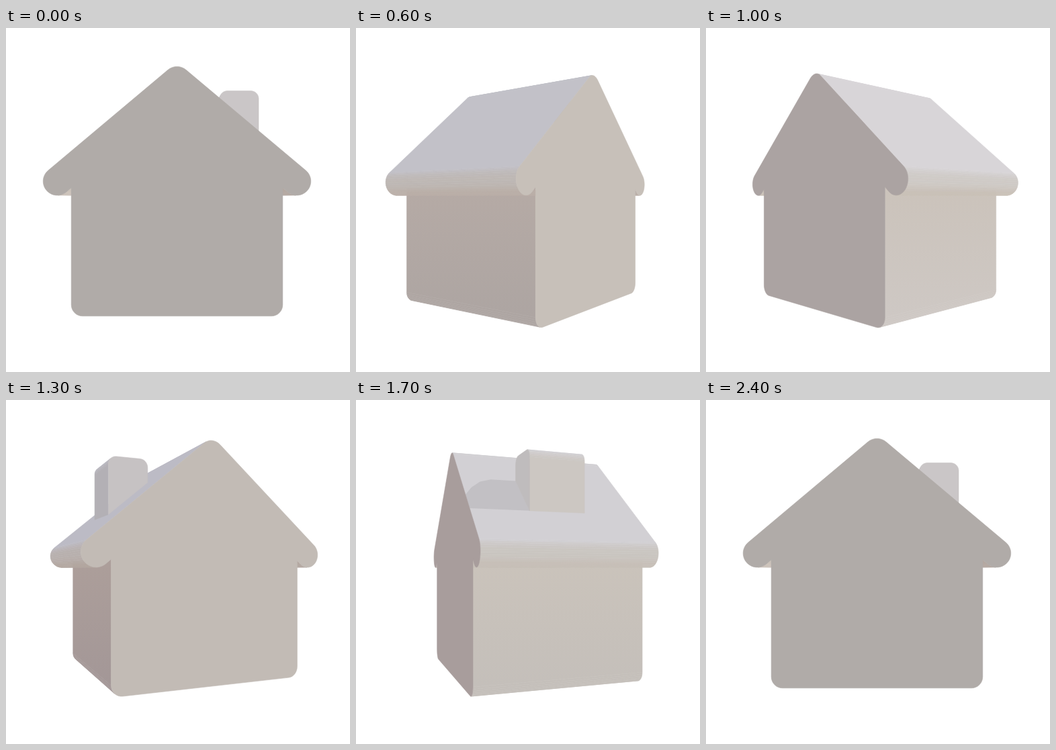
Recreate the animation shown at these times as an HTML page with a canvas. Size 512 by 512 pixels, loop 2.5 s.

```html
<!DOCTYPE html>
<html>
<head>
<meta charset="utf-8">
<style>
html, body { margin: 0; width: 100%; height: 100%; overflow: hidden; background: #fff; }
canvas { display: block; width: 100vmin; height: 100vmin; }
</style>
</head>
<body>
<canvas id="stage" width="512" height="512"></canvas>
<script>
const ctx = document.getElementById('stage').getContext('2d');
const RAD = Math.PI / 180;
const CX = 254.5, HORIZON = 250, CAMERA = 700;
const DEPTH = 112.6, WALL = 132, NOTCH = 10.2, FLOOR = -150;
const CHIMNEY = { left: 60, right: 115, top: 148, depth: 37.5, radius: 11 };

// Colours by the direction a surface turns to, in degrees right of the viewer
const ANGLES = [-68, -24, 0, 22, 68];
const palette = text => text.split(' ').map(h => [0, 2, 4].map(i => parseInt(h.substr(i, 2), 16)));
const COLORS = {
  face: palette('a89d9c aeaaa8 b0aba8 c2bbb5 cac2bb'),
  wallTop: palette('ab9d99 bab0aa c6bfb9 cbc3bb ccc2ba'),
  wallLow: palette('a29696 b2aba7 bfbbb6 c5c0ba d9d2d0'),
  roof: palette('bcbbc5 c4c3c9 cac8cd d3d1d5 dedadc'),
  eave: palette('b8b0ae c0bbb7 c6c2bd cac6c1 d4cfcc'),
  under: palette('b3a7a0 bdb3ab c3bbb4 c8c0b8 cbc2b9'),
  stackFace: palette('bfbcbd c4c0c0 cac6c7 c6c2c3 cbc7c7'),
  stackSide: palette('b3b0b5 c0bcbd c9c4c2 ccc7c2 d6d1d0')
};

const mix = (a, b, k) => a.map((v, i) => v + (b[i] - v) * k);
const css = c => `rgb(${c.map(Math.round)})`;

function shade(name, angle) {
  const list = COLORS[name];
  let i = 0;
  while (i < 3 && angle > ANGLES[i + 1]) i++;
  const k = (angle - ANGLES[i]) / (ANGLES[i + 1] - ANGLES[i]);
  return mix(list[i], list[i + 1], Math.min(1, Math.max(0, k)));
}

function arc(x, y, r, from, to, steps) {
  return Array.from({ length: steps + 1 }, (_, i) => {
    const a = (from + (to - from) * i / steps) * RAD;
    return [x + r * Math.cos(a), y + r * Math.sin(a)];
  });
}

const half = [
  ...arc(WALL - 14, FLOOR + 14, 14, -90, 0, 8),
  [WALL, NOTCH],
  ...arc(149.6, 18.4, 17.6, -130, 50, 20),
  ...arc(0, 144, 17.6, 50, 90, 8)
];
const house = [...half, ...half.slice(0, -1).reverse().map(([x, y]) => [-x, y])];

const slopeY = x => 31.9 + (160.9 - x) * 0.84;
const { left, right, top: stackTop, depth: stackDepth, radius } = CHIMNEY;
const stack = [
  [right, slopeY(right)],
  ...arc(right - radius, stackTop - radius, radius, 0, 90, 8),
  ...arc(left + radius, stackTop - radius, radius, 90, 180, 8),
  [left, slopeY(left)]
];

let turn = 0;

function project([x, y, z]) {
  const c = Math.cos(turn), s = Math.sin(turn);
  const k = CAMERA / (CAMERA + x * s - z * c);
  return [CX + (x * c + z * s) * k, HORIZON - y * k];
}

// Direction of a model normal (x, z) after turning
function heading(x, z) {
  const c = Math.cos(turn), s = Math.sin(turn);
  return Math.atan2(x * c + z * s, z * c - x * s) / RAD;
}

function polygon(points, paint, outlined = true) {
  const flat = points.map(project);
  let area = 0;
  flat.forEach(([x, y], i) => {
    const [u, v] = flat[(i + 1) % flat.length];
    area += x * v - u * y;
  });
  if (area >= 0) return;
  ctx.beginPath();
  flat.forEach(p => ctx.lineTo(...p));
  ctx.closePath();
  ctx.fillStyle = ctx.strokeStyle = paint;
  ctx.fill();
  if (outlined) ctx.stroke();
}

function sides(outline, depth, accept, paint) {
  outline.forEach((p, i) => {
    const q = outline[(i + 1) % outline.length];
    if (!accept(p, q)) return;
    const dx = q[0] - p[0], dy = q[1] - p[1];
    const up = -dx / Math.hypot(dx, dy);
    polygon([[...p, depth], [...p, -depth], [...q, -depth], [...q, depth]],
      paint(up, heading(dy || p[0], 0)));
  });
}

function caps(outline, depth, name) {
  polygon(outline.map(p => [...p, depth]), css(shade(name, heading(0, 1))));
  polygon(outline.map(p => [...p, -depth]).reverse(), css(shade(name, heading(0, -1))));
}

function wallPaint(up, angle) {
  const g = ctx.createLinearGradient(0, 245, 0, 430);
  const top = css(shade('wallTop', angle)), low = css(shade('wallLow', angle));
  const lit = angle > 45 && angle < 90;
  g.addColorStop(lit ? 0.41 : 0, top);
  g.addColorStop(lit ? 0.45 : 1, low);
  return g;
}

function roofPaint(up, angle) {
  const target = shade(up > 0 ? 'roof' : 'under', angle);
  const k = Math.min(1, Math.abs(up) / 0.766);
  return css(mix(shade('eave', angle), target, k * k));
}

const stackPaint = (up, angle) =>
  css(mix(shade('stackSide', angle), shade('roof', angle), Math.max(0, up)));

const isWall = (p, q) =>
  Math.max(p[1], q[1]) <= NOTCH && Math.max(Math.abs(p[0]), Math.abs(q[0])) <= WALL + 0.01;

function drawStack() {
  sides(stack, stackDepth, (p, q) => p[0] !== left || q[0] !== right, stackPaint);
  caps(stack, stackDepth, 'stackFace');
}

// Soft shade beside the chimney on its slope
function drawShadow() {
  const alpha = 0.11 * Math.max(0, Math.cos(turn - 290 * RAD)) ** 6;
  const spots = [[right, stackDepth], [left, stackDepth], [left, 72], [66, 88], [78, 102],
    [92, DEPTH], [right, DEPTH]];
  polygon(spots.map(([x, z]) => [x, slopeY(x), z]), `rgba(70,65,70,${alpha})`, false);
}

function draw(now) {
  const step = Math.floor(now % 2500 / 100);
  turn = Math.PI * (1 - Math.cos(Math.PI * step / 24));
  ctx.fillStyle = '#fff';
  ctx.fillRect(0, 0, 512, 512);
  ctx.lineWidth = 0.6;
  ctx.lineJoin = 'round';

  const stackInFront = Math.sin(turn) < -0.01;
  if (!stackInFront) drawStack();
  sides(house, DEPTH, isWall, wallPaint);
  sides(house, DEPTH, (p, q) => !isWall(p, q), roofPaint);
  if (stackInFront) {
    drawShadow();
    drawStack();
  }
  caps(house, DEPTH, 'face');
  requestAnimationFrame(draw);
}
requestAnimationFrame(draw);
</script>
</body>
</html>
```
